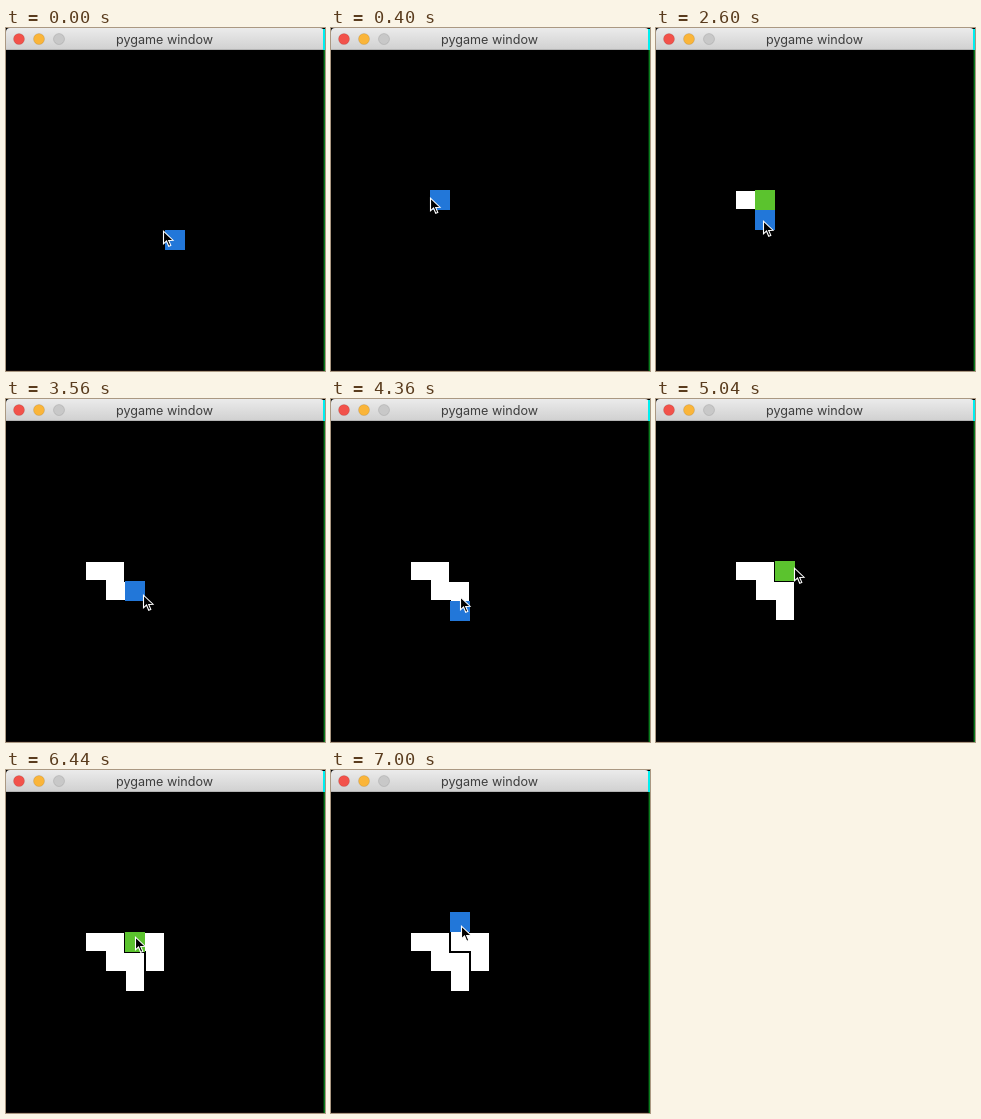
Write an HTML page with a canvas that moves like this. It is 319 by 343 pixels and loops after 7.12 s.

```html
<!DOCTYPE html>
<html lang="en">
<head>
<meta charset="utf-8">
<title>pygame window</title>
<style>
  html, body { margin: 0; width: 100%; height: 100%; overflow: hidden; background: #000; }
  canvas { display: block; }
</style>
</head>
<body>
<canvas id="stage" width="319" height="343"></canvas>
<script>
const ctx = document.getElementById('stage').getContext('2d');
const LOOP = 7120, STEP = 40, CELL = 20, LEFT = -1, TOP = 22;
const BLUE = '#2277d9', GREEN = '#5bc32e';

// Where the pointer rests and when it clicks; a click with "start" begins a new path
const stops = [
  { x: 164, y: 206, click: -170 },
  { x: 95, y: 167, click: 920, start: true },
  { x: 110, y: 170, click: 1720 },
  { x: 107, y: 192, click: 2760 },
  { x: 137, y: 195, click: 3560 },
  { x: 129, y: 214, click: 4200 },
  { x: 130, y: 168, click: 4880, start: true },
  { x: 148, y: 167, click: 5480 },
  { x: 145, y: 194, click: 6040 },
  { x: 129, y: 166, click: 6400, start: true },
  { x: 130, y: 155, click: 7000 }
];

// Between two clicks the pointer waits, travels, then rests.
// Continuing a path takes one more click on its end before leaving.
const moves = stops.slice(1).map((to, i) => {
  const from = stops[i], gap = to.click - from.click;
  const linked = i > 0 && !to.start, again = linked && !from.start;
  return {
    from, to, linked,
    picked: from.click + (again ? 0.28 * gap : 0),
    leave: from.click + (again ? 0.28 : 0.13) * gap,
    arrive: to.click - 0.36 * gap
  };
});

function cursorAt(t) {
  const { from, to, leave, arrive } = moves.find(m => t < m.to.click) || moves[moves.length - 1];
  const u = Math.min(1, Math.max(0, (t - leave) / (arrive - leave)));
  const k = 1 - (1 - u) ** 2;
  return {
    x: Math.round(from.x + (to.x - from.x) * k),
    y: Math.round(from.y + (to.y - from.y) * k)
  };
}

function cellAt({ x, y }) {
  return {
    x: LEFT + Math.floor((x + 1 - LEFT) / CELL) * CELL,
    y: TOP + Math.floor((y - TOP) / CELL) * CELL
  };
}

function rect(color, x, y, w, h) {
  ctx.fillStyle = color;
  ctx.fillRect(x, y, w, h);
}

function fillCell(point, color) {
  const { x, y } = cellAt(point);
  rect(color, x, y, CELL, CELL);
}

function fillLink(from, to) {
  const a = cellAt(from), b = cellAt(to);
  rect('#fff', Math.min(a.x, b.x) + 1, Math.min(a.y, b.y) + 1,
    Math.abs(a.x - b.x) + CELL - 2, Math.abs(a.y - b.y) + CELL - 2);
}

function drawWindow() {
  rect('#000', 0, 0, 319, 343);
  const bar = ctx.createLinearGradient(0, 0, 0, 22);
  bar.addColorStop(0, '#ebebeb');
  bar.addColorStop(1, '#d0d0d0');
  ctx.fillStyle = bar;
  ctx.beginPath();
  ctx.roundRect(0, 0, 318, 22, [4, 4, 0, 0]);
  ctx.fill();
  rect('#b4b4b4', 0, 21, 318, 1);
  rect('#00f0f0', 317, 1, 2, 21);
  rect('#02300a', 317, 22, 1, 321);
  rect('#087a1c', 318, 22, 1, 321);
  rect('#140a0a', 0, 342, 317, 1);

  ['#f2524b', '#fab53a', '#c8c8c8'].forEach((color, i) => {
    ctx.beginPath();
    ctx.arc(13 + CELL * i, 11, 5.5, 0, 2 * Math.PI);
    ctx.fillStyle = color;
    ctx.fill();
    ctx.strokeStyle = 'rgba(0, 0, 0, 0.1)';
    ctx.lineWidth = 1;
    ctx.stroke();
  });

  ctx.fillStyle = '#3e3e3e';
  ctx.font = '12.6px Inter, sans-serif';
  ctx.textAlign = 'center';
  ctx.fillText('pygame window', 158.5, 16);
}

const arrow = new Path2D('M.5 1.2V13.8L3.5 11L5.7 16.3L7.8 15.4L5.7 10.5L10 10.2Z');

function drawCursor({ x, y }) {
  ctx.save();
  ctx.translate(x, y);
  ctx.fillStyle = '#000';
  ctx.fill(arrow);
  ctx.strokeStyle = '#fff';
  ctx.lineWidth = 1.1;
  ctx.stroke(arrow);
  ctx.restore();
}

function draw(now) {
  const t = Math.floor((now % LOOP) / STEP) * STEP;
  const links = moves.filter(m => m.linked);
  drawWindow();
  for (const { from, to } of links) if (t >= to.click) fillLink(from, to);

  // The highlight trails the pointer by one step
  fillCell(cursorAt(t - STEP), BLUE);

  const active = links.find(m => t >= m.picked && t < m.to.click);
  if (active) fillCell(active.from, GREEN);
  drawCursor(cursorAt(t));
}

const start = performance.now();
function tick() {
  draw(performance.now() - start);
  requestAnimationFrame(tick);
}
tick();
</script>
</body>
</html>
```
